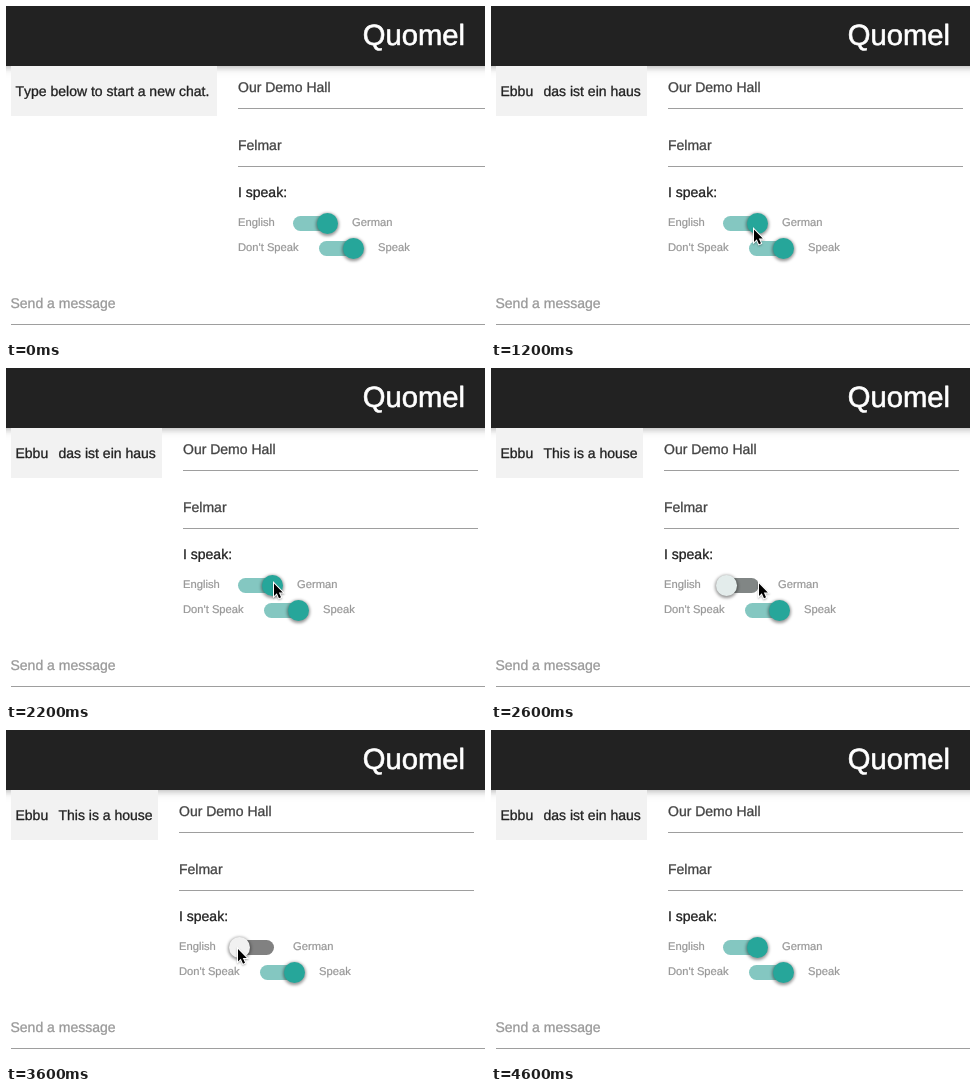
An HTML page with a canvas for the animation above (4.8 s loop, 479 px wide and 334 px high).

```html
<!DOCTYPE html>
<html lang="en">
<head>
<meta charset="utf-8">
<title>Translated chat room</title>
<style>
  html, body { margin: 0; width: 100%; height: 100%; overflow: hidden; background: #fff; }
  canvas { display: block; width: 479px; height: 334px; }
</style>
</head>
<body>
<canvas id="stage" width="479" height="334"></canvas>
<script>
const ctx = document.getElementById('stage').getContext('2d');
const LOOP = 4800;
const STEP = 200;
const FONT = '"Liberation Sans", Arial, sans-serif';
const INK = '#212121', INPUT = '#444', MUTED = '#999';
const TEAL = [38, 166, 154], TEAL_TRACK = [132, 199, 193];
const OFF_KNOB = [241, 241, 241], OFF_TRACK = [129, 129, 129];

// Pointer stops: time, x, y
const pointerPath = [
  [600, 335, 271], [800, 312, 252], [1000, 277, 230], [1200, 262, 222],
  [1600, 267, 214], [2800, 267, 214], [3000, 256, 215.5],
  [3200, 243, 217], [3400, 235, 218], [3600, 231, 217.5], [4600, 231, 217.5]
];

const lerp = (a, b, k) => a + (b - a) * k;
const mix = (a, b, k) => `rgb(${a.map((v, i) => Math.round(lerp(v, b[i], k)))})`;

// A hairline stroke gives the letters a slightly fuller weight.
function text(str, x, y, color = INK, size = 14, align = 'left') {
  ctx.font = `${size}px ${FONT}`;
  ctx.fontKerning = 'none';
  ctx.textRendering = 'geometricPrecision';
  ctx.textAlign = align;
  ctx.fillStyle = ctx.strokeStyle = color;
  ctx.lineWidth = size * 0.022;
  ctx.lineJoin = 'round';
  ctx.fillText(str, x, y);
  ctx.strokeText(str, x, y);
}

function rect(x, y, w, h, color) {
  ctx.fillStyle = color;
  ctx.fillRect(x, y, w, h);
}

function disc(x, y, radius, color) {
  ctx.fillStyle = color;
  ctx.beginPath();
  ctx.arc(x, y, radius, 0, Math.PI * 2);
  ctx.fill();
}

function withShadow(alpha, blur, dy, draw) {
  ctx.save();
  ctx.shadowColor = `rgba(0,0,0,${alpha})`;
  ctx.shadowBlur = blur;
  ctx.shadowOffsetY = dy;
  draw();
  ctx.restore();
}

function toggle(x, y, on) {
  const knobX = x + lerp(5.5, 34.5, on);
  ctx.fillStyle = mix(OFF_TRACK, TEAL_TRACK, on);
  ctx.beginPath();
  ctx.roundRect(x, y - 7.5, 40, 15, 7.5);
  ctx.fill();
  ctx.filter = 'blur(1.5px)';
  disc(knobX, y + 1, 11.5, 'rgba(0,0,0,0.4)');
  ctx.filter = 'none';
  disc(knobX, y, 10.5, mix(OFF_KNOB, TEAL, on));
}

function header() {
  withShadow(0.16, 5, 2, () => rect(-20, -20, 519, 80, '#222'));
  withShadow(0.12, 10, 2, () => rect(-20, -20, 519, 80, '#222'));
  text('Quomel', 459, 39, '#fff', 29.2, 'right');
}

function chat(message, right) {
  rect(5, 60, right - 5, 50, '#f2f2f2');
  if (message) {
    text('Ebbu', 9.5, 90);
    text(message, 52.5, 90);
  } else {
    text('Type below to start a new chat.', 9.5, 90);
  }
}

function settings(x, germanOn) {
  text('Our Demo Hall', x, 86, INPUT);
  rect(x, 102, 295, 1, '#9e9e9e');
  text('Felmar', x, 144, INPUT);
  rect(x, 160, 295, 1, '#9e9e9e');
  text('I speak:', x, 191);
  text('English', x, 220, MUTED, 11.2);
  toggle(x + 55, 217.5, germanOn);
  text('German', x + 114, 220, MUTED, 11.2);
  text("Don't Speak", x, 245, MUTED, 11.2);
  toggle(x + 81, 242.5, 1);
  text('Speak', x + 140, 245, MUTED, 11.2);
}

function pointer(t) {
  const next = pointerPath.findIndex(p => p[0] > t);
  if (next < 1) return;
  const [t0, x0, y0] = pointerPath[next - 1];
  const [t1, x1, y1] = pointerPath[next];
  const k = (t - t0) / (t1 - t0);
  ctx.save();
  ctx.translate(lerp(x0, x1, k), lerp(y0, y1, k));
  ctx.beginPath();
  ctx.moveTo(1, 1.5);
  ctx.lineTo(1, 14);
  ctx.lineTo(3.8, 11.3);
  ctx.lineTo(6, 16.2);
  ctx.lineTo(8, 15.3);
  ctx.lineTo(5.8, 10.5);
  ctx.lineTo(9.8, 10.5);
  ctx.closePath();
  ctx.lineWidth = 2;
  ctx.lineJoin = 'miter';
  ctx.strokeStyle = '#fff';
  withShadow(0.3, 2, 1, () => ctx.stroke());
  ctx.fillStyle = '#000';
  ctx.fill();
  ctx.restore();
}

function switchState(t) {
  if (t < 2600) return 1;
  if (t < 2800) return 0.07;
  if (t < 3800) return 0;
  return t < 4000 ? 0.93 : 1;
}

function frame(now) {
  const t = Math.floor((now % LOOP) / STEP) * STEP;
  const waiting = t < 400;
  const english = t >= 2600 && t < 3800;
  rect(0, 0, 479, 334, '#fff');
  header();
  if (waiting) chat('', 211);
  else if (english) chat('This is a house', 152);
  else chat('das ist ein haus', 156);
  settings(waiting ? 232 : english ? 173 : 177, switchState(t));
  text('Send a message', 4.5, 302, MUTED);
  rect(5, 318, 474, 1, '#9e9e9e');
  pointer(t);
}

const start = performance.now();
function tick() {
  frame(performance.now() - start);
  requestAnimationFrame(tick);
}
tick();
</script>
</body>
</html>
```
